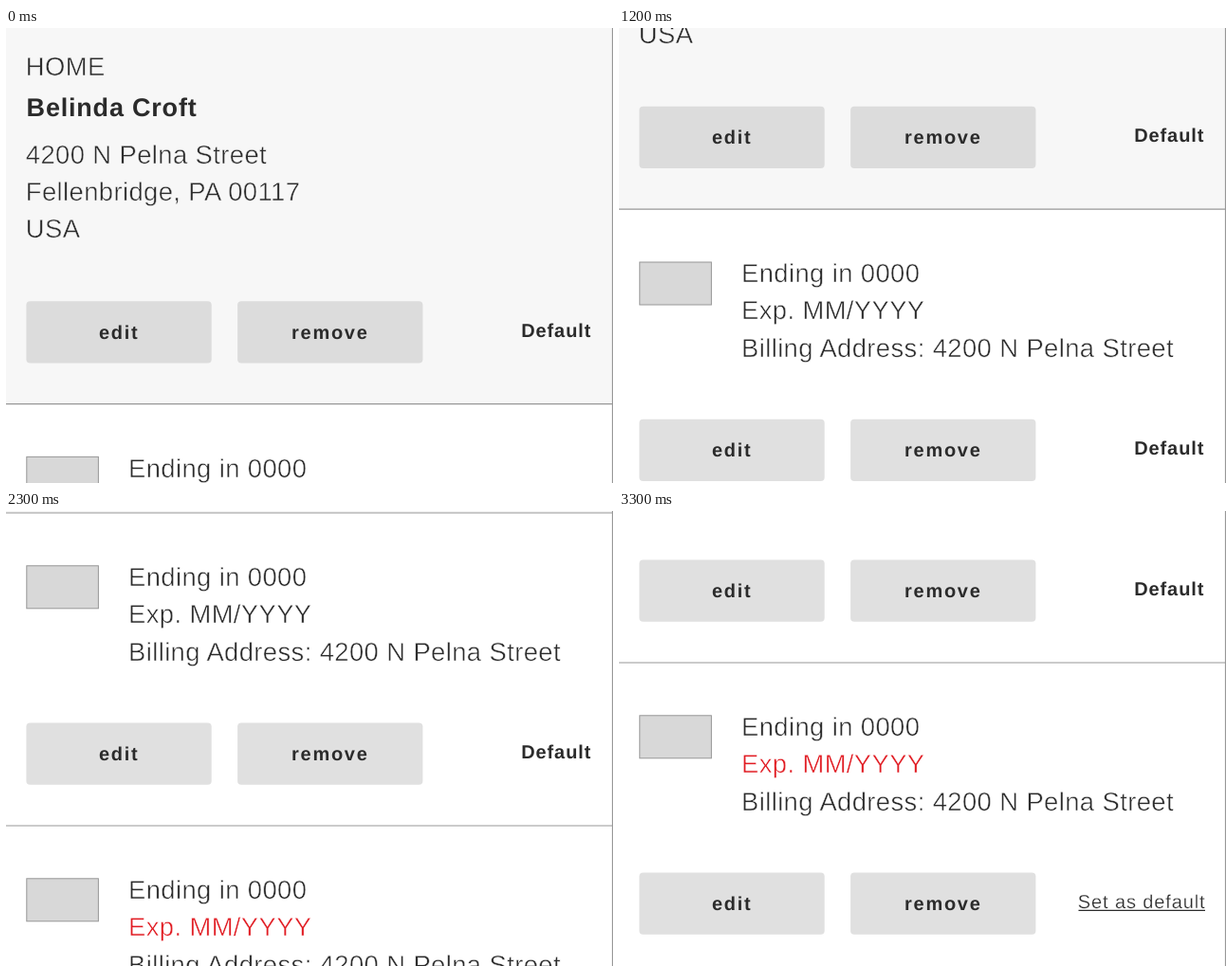
Write an HTML page that moves like this. It is 640x480 px and loops after 3.4 s.

```html
<!DOCTYPE html>
<html lang="en">
<head>
<meta charset="utf-8">
<title>Saved details</title>
<style>
  html, body { margin: 0; width: 100%; height: 100%; overflow: hidden; background: #fff; }
  svg { display: block; width: 640px; height: 480px; }
  text {
    font-family: "Liberation Sans", Arial, sans-serif;
    fill: #2b2b2b;
    text-rendering: geometricPrecision;
    white-space: pre;
  }
  /* a thin outline in the background colour lightens the strokes */
  .light { font-size: 27.4px; letter-spacing: .4px; stroke: #fff; stroke-width: .55px; }
  .tinted .light { stroke: #f7f7f7; }
  .name { font-size: 27px; font-weight: 700; letter-spacing: .8px; }
  .label { font-size: 20px; font-weight: 700; letter-spacing: 1.7px; text-anchor: middle; }
  .default { font-size: 20px; font-weight: 700; letter-spacing: .9px; }
  .link { font-size: 20px; letter-spacing: .88px; stroke: #fff; stroke-width: .3px; }
  .red { fill: #e11b22; }
  .button { fill: #e0e0e0; }
  .tinted .button { fill: #dcdcdc; }
  .card { fill: #d8d8d8; stroke: #979797; }
  .rule { stroke: #979797; stroke-width: 1.2px; }
</style>
</head>
<body>
<svg viewBox="0 0 640 480">
  <g id="page"></g>
  <path class="rule" d="M639.5 0V480"/>
</svg>
<script>
const STEP_MS = 100, STEPS = 34, STEP_PX = 17.2;
const SECTION = 330, STREET = "4200 N Pelna Street";
const page = document.getElementById("page");

const text = (x, y, cls, str) => `<text x="${x}" y="${y}" class="${cls}">${str}</text>`;

const button = (x, label) =>
  `<rect class="button" x="${x}" y="288.2" width="195.3" height="65.2" rx="4"/>` +
  text(x + 97.7, 327.5, "label", label);

const footer = status =>
  button(21.4, "edit") + button(244.1, "remove") + status +
  `<path class="rule" d="M0 396.6H640"/>`;

const isDefault = text(543.2, 325.5, "default", "Default");
const setDefault = text(483.8, 325.5, "link", "Set as default") +
  `<path d="M484.5 328H618" stroke="#2b2b2b" stroke-width="1.3"/>`;

const address = `<g class="tinted"><rect width="640" height="396.6" fill="#f7f7f7"/>` +
  text(20.8, 49.7, "light", "HOME") +
  text(21.6, 93.3, "name", "Belinda Croft") +
  [STREET, "Fellenbridge, PA 00117", "USA"]
    .map((line, i) => text(20.8, 142.7 + 39.3 * i, "light", line)).join("") +
  footer(isDefault) + "</g>";

const payment = (index, expired, status) => `<g transform="translate(0 ${SECTION * index})">` +
  `<rect class="card" x="21.8" y="122.4" width="75.6" height="45"/>` +
  ["Ending in 0000", "Exp. MM/YYYY", "Billing Address: " + STREET]
    .map((line, i) => text(129, 143.5 + 39.4 * i, expired && i === 1 ? "light red" : "light", line))
    .join("") +
  footer(status) + "</g>";

page.innerHTML = address + payment(1, false, isDefault) + payment(2, true, setDefault);

function draw() {
  const step = Math.floor(performance.now() / STEP_MS) % STEPS;
  // the first step is about a pixel shorter than the rest
  const scroll = Math.max(0, step * STEP_PX - 1);
  page.setAttribute("transform", `translate(0 ${-scroll})`);
  requestAnimationFrame(draw);
}
draw();
</script>
</body>
</html>
```
